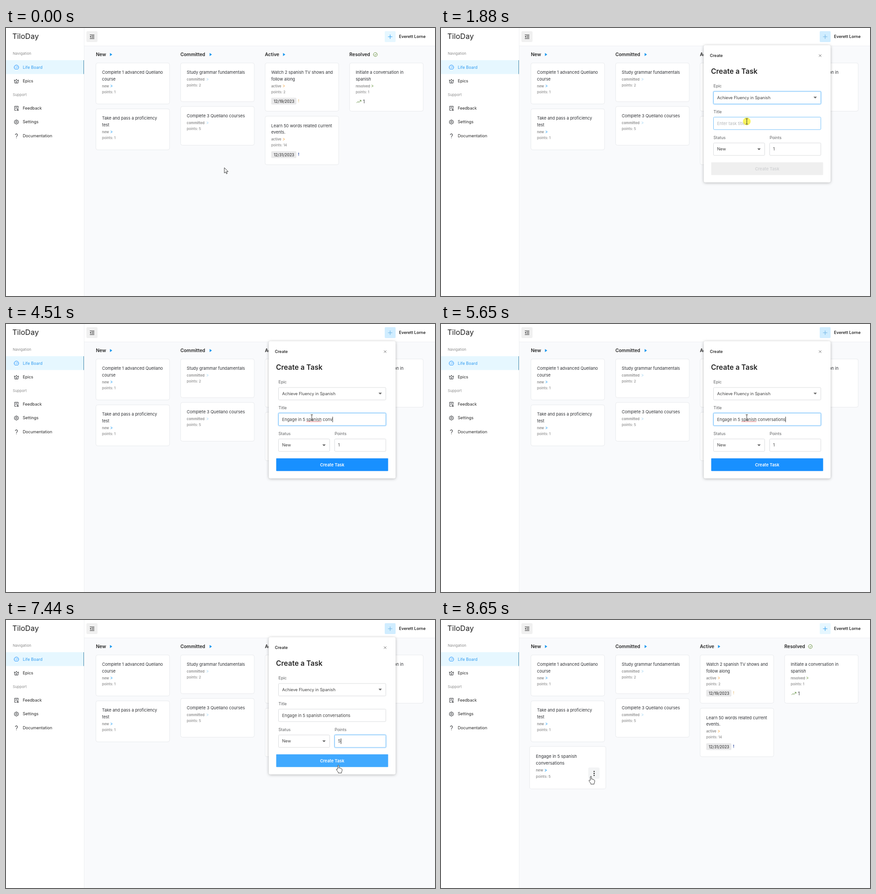
These frames come from a looping animation (947 px wide and 591 px high, 9.05 s). An HTML page:

```html
<!DOCTYPE html>
<html lang="en">
<head>
<meta charset="utf-8">
<title>Task board</title>
<style>
  html, body { margin: 0; width: 100%; height: 100%; overflow: hidden; background: #f9fafc; }
  svg { display: block; width: 947px; height: 591px; font-family: Inter, "Open Sans", sans-serif; }
  .panel { filter: drop-shadow(0 1px 3px rgba(0, 0, 0, .28)); }
</style>
</head>
<body>
<svg viewBox="0 0 947 591"><g id="board"></g><g id="live"></g></svg>
<script>
const LOOP = 9050;
const BLUE = '#1890ff', INK = '#303236', GRAY = '#8c8c8c';
const TASK = 'Engage in 5 spanish conversations';
const INPUT_SIZE = 9.2;

// ---------- drawing helpers ----------
const text = (x, y, str, size = 9.2, color = INK, weight = 430, extra = '') =>
  `<text x="${x}" y="${y}" font-size="${size}" fill="${color}" font-weight="${weight}" ${extra}>${str}</text>`;
const rect = (x, y, w, h, fill, r = 0, extra = '') =>
  `<rect x="${x}" y="${y}" width="${w}" height="${h}" rx="${r}" fill="${fill}" ${extra}/>`;
const line = (d, color, width = 1, extra = '') =>
  `<path d="${d}" fill="none" stroke="${color}" stroke-width="${width}" ${extra}/>`;
const shape = (d, fill, extra = '') => `<path d="${d}" fill="${fill}" ${extra}/>`;
const group = (content, attrs) => `<g ${attrs}>${content}</g>`;
const at = (x, y, content) => group(content, `transform="translate(${x} ${y})"`);

const pen = document.createElement('canvas').getContext('2d');
const inputWidth = str => {
  pen.font = `430 ${INPUT_SIZE}px Inter, "Open Sans", sans-serif`;
  return pen.measureText(str).width;
};

// ---------- timing helpers ----------
const progress = (t, from, to) => Math.min(1, Math.max(0, (t - from) / (to - from)));
const within = (t, from, to) => t >= from && t < to;
const smooth = p => p * p * (3 - 2 * p);
const latest = (steps, t) => steps.filter(s => s[0] <= t).pop()[1];

// ---------- board ----------
const STATUS = {
  new: { chevron: '#29a3f5', offset: 19 },
  committed: { chevron: '#a9d8f5', offset: 44 },
  active: { chevron: '#f5a742', offset: 26 },
  resolved: { chevron: '#6f9a45', offset: 35 }
};

function card(x, y, h, lines, status, points, extra = '') {
  const base = y + 24 + (lines.length - 1) * 14.7;
  const { chevron, offset } = STATUS[status];
  return rect(x, y, 162.5, h, '#fff', 4, 'stroke="#e8eaed"') +
    lines.map((s, i) => text(x + 13.5, y + 24 + i * 14.7, s)).join('') +
    text(x + 13.5, base + 15, status, 7.6, GRAY, 600) +
    line(`M${x + 13.5 + offset} ${base + 9.7}l3.6 2.4-3.6 2.4`, chevron) +
    text(x + 13.5, base + 28.2, 'points: ' + points, 7.6, GRAY, 540) + extra;
}

const dateChip = (y, date, mark) =>
  rect(585.5, y, 55.5, 15, '#e9e9ea', 2) + text(591, y + 10.7, date, 8.5, '#3a3a3a', 480) +
  text(644.5, y + 10.5, '!', 9.5, mark, 600);

const heading = (x, name, arrowX) => text(x, 61.7, name, 10.3, '#262626', 600) +
  (arrowX ? shape(`M${arrowX} 55l5 3.5-5 3.5z`, '#1c98ee') : '');

function navIcons() {
  const teeth = Array.from({ length: 8 }, (_, i) =>
    `<path d="M0-5.4V-4" transform="rotate(${i * 45})"/>`).join('');
  const outline = 'fill="none" stroke-width="1"';
  return at(23, 86.5, group('<path d="M-3.3 4A5 5 0 1 1 3.3 4zM0 1L2-2M-3 0h1M2.5 0h.8M-1.5-2.7l.4.6"/>',
      `${outline} stroke="${BLUE}"`)) +
    at(23, 117, group('<path d="M-4.7-2.5L-3.5 4.5h7L4.7-2.5 2-.6 0-4.2-2-.6z"/><circle cy="1.8" r="1.1"/>',
      `${outline} stroke="${INK}"`)) +
    at(23, 177, group('<path d="M4-.5V-4.5h-8V4.5H-.5M-2.2-2h4.5M-2.2.4h2.5M1 4.8q0-2 1.8-2t1.8 2z"/><circle cx="2.8" cy="1.5" r="1.1"/>',
      `${outline} stroke="${INK}"`)) +
    at(23, 207.3, group(`<circle r="4.1"/><circle r="1.6"/>${teeth}`, `${outline} stroke="${INK}"`)) +
    at(23, 238, line('M-2.4-2.2a2.4 2.4 0 1 1 3.6 2.1Q0 .6 0 2.2M0 3.8v1.2', INK, 1.1));
}

function board() {
  const nav = [['Life Board', 89.5], ['Epics', 120], ['Feedback', 180], ['Settings', 210.3], ['Documentation', 241.2]];
  return rect(0, 0, 947, 591, '#f9fafc') + rect(0, 0, 172, 591, '#fff') + rect(172, 0, 775, 39, '#fff') +
    line('M172.5 0V591M172 39.5H947', '#eef0f2') +
    text(14, 24, 'TiloDay', 16.4, '#1f1f1f', 400) +
    text(15, 59, 'Navigation', 8.1, GRAY) + text(15, 149.7, 'Support', 8.1, GRAY) +
    rect(0, 71, 171, 30.5, '#e6f7ff') + rect(171, 71, 1, 30.5, '#4289b0') +
    nav.map(([s, y], i) => text(37, y, s, 9.05, i ? '#262626' : '#329cf0')).join('') + navIcons() +
    rect(177.5, 7, 24.5, 24, '#f0f0f0', 3) +
    line('M185 15.2h10M189 17.9h6M189 20.6h6M185 23.4h10', '#262626') + shape('M187.6 17.2v4.2L185 19.3z', '#262626') +
    text(867.5, 22.3, 'Everett Lorne', 9.1, '#262626', 600) +
    heading(198.5, 'New', 229.5) + heading(385, 'Committed', 449.5) +
    heading(571.5, 'Active', 611.5) + heading(758, 'Resolved') +
    `<circle cx="815.3" cy="58.5" r="4.3" fill="none" stroke="#6a9240"/>` + line('M813 58.5l1.8 1.8 3-3.6', '#6a9240') +
    card(198.5, 77, 90.5, ['Complete 1 advanced Quellano', 'course'], 'new', 1) +
    card(198.5, 178.3, 90.5, ['Take and pass a proficiency', 'test'], 'new', 1) +
    card(385.5, 77, 85.5, ['Study grammar fundamentals'], 'committed', 2) +
    card(385.5, 173, 85.5, ['Complete 3 Quellano courses'], 'committed', 5) +
    card(572, 77, 106.5, ['Watch 2 spanish TV shows and', 'follow along'], 'active', 2, dateChip(153.8, '12/19/2023', '#ecc98a')) +
    card(572, 194.5, 107, ['Learn 50 words related current', 'events.'], 'active', 14, dateChip(271.8, '12/31/2023', '#27439b')) +
    card(758.5, 77, 106.5, ['Initiate a conversation in', 'spanish'], 'resolved', 1,
      line('M774 165.2l3-3 2 1.8 4.6-4.4M780.8 159.3h3v3', '#5c8a3a') + text(788, 165.5, '1', 10, INK));
}

function newCard(t) {
  if (t < 7840) return '';
  const hover = smooth(progress(t, 8480, 8640));
  const more = rect(325, 325.3, 25, 25, '#f3f4f5', 3) +
    [334, 338.4, 342.8].map(y => `<circle cx="338" cy="${y}" r="1.3" fill="#262626"/>`).join('');
  return group(card(198.5, 280.3, 90.5, ['Engage in 5 spanish', 'conversations'], 'new', 5),
    `transform="translate(279.75 325.5) scale(${1 + .036 * hover}) translate(-279.75 -325.5)"`) +
    group(more, `opacity="${hover}"`);
}

function plusButton(t) {
  const pressed = within(t, 420, 7820);
  return rect(836, 7, 24, 24, pressed ? '#d0edff' : '#e6f7ff', 2) +
    line('M843.2 19.3h9.6M848 14.5v9.6', pressed ? '#6fb4e4' : '#2d9ff2', 1.1);
}

// ---------- dialog ----------
const TYPING = [[0, 0], [2230, 1], [2300, 2], [2360, 3], [2430, 4], [2570, 5], [2630, 6],
  [2850, 7], [2910, 8], [2980, 9], [3040, 10], [3380, 11], [3500, 12], [3700, 15],
  [3840, 16], [3940, 17], [4040, 18], [4180, 19], [4240, 20], [4380, 22], [4510, 24],
  [4710, 25], [4840, 26], [4970, 27], [5170, 28], [5250, 29], [5340, 30], [5420, 31], [5510, 32], [5650, 33]];

function field(x, y, w, focused, hovered) {
  const glow = focused ? rect(x - 1, y - 1, w + 2, 29.5, 'none', 3, 'stroke="#1890ff" stroke-opacity=".2" stroke-width="1.6"') : '';
  return glow + rect(x, y, w, 27.5, '#fff', 2, `stroke="${focused || hovered ? '#74c0fa' : '#dadcde'}"`);
}
const triangle = (x, y, up) => shape(up ? `M${x - 3.7} ${y + 2}h7.4l-3.7-4z` : `M${x - 3.7} ${y - 2}h7.4l-3.7 4z`, '#666');
const caret = (x, y) => line(`M${x} ${y - 6}v12`, '#222');

function titleContent(t) {
  const typed = TASK.slice(0, latest(TYPING, t));
  const focused = within(t, 1940, 6380);
  let out = typed ? text(609.5, 213.8, typed, INPUT_SIZE, '#404040') : text(609.5, 213.8, 'Enter task title', 9.2, '#b4b6b8');
  if (focused) out += caret(610 + inputWidth(typed), 210.5);
  if (focused && t >= 4240) {
    const from = 609.5 + inputWidth('Engage in 5 ');
    const waves = Math.round(inputWidth('spanish') / 3);
    out += line(`M${from} 216` + 'l1.5-1.4l1.5 1.4'.repeat(waves), '#e0444c', .8);
  }
  return out;
}

function pointsContent(t) {
  const selected = within(t, 6510, 7440);
  return (selected ? rect(732.3, 261, 5.6, 12.3, '#3c5a9c') : '') +
    text(733, 270.4, t < 7440 ? '1' : '5', 9.1, selected ? '#fff' : '#404040') +
    (within(t, 7440, 7770) ? caret(739.5, 267.3) : '');
}

function submitButton(t) {
  const enabled = smooth(progress(t, 2200, 2430));
  const label = color => text(720, 314.2, 'Create Task', 9.3, color, 600, 'text-anchor="middle"');
  const hover = within(t, 6900, 7770);
  return rect(596.5, 296.3, 247, 28, '#efefef', 1) + label('#d2d3d5') +
    group(rect(596.5, 296.3, 247, 28, hover ? '#40a9ff' : BLUE, 1) + label('#fff'), `opacity="${enabled}"`);
}

function options(t) {
  const opacity = progress(t, 1000, 1130) * (1 - progress(t, 1530, 1700));
  if (!opacity) return '';
  return group(rect(601.5, 170, 237, 34, '#fff', 2, 'class="panel"') +
    rect(601.5, 174.5, 237, 25, t > 1150 ? '#eef3f7' : '#fff') +
    text(609.5, 190.5, 'Achieve Fluency in Spanish', 9.1, '#404040'), `opacity="${opacity}"`);
}

function dialog(t) {
  const opacity = smooth(progress(t, 500, 680)) * (1 - progress(t, 7770, 7970)) ** 2;
  if (!opacity) return '';
  const label = (x, y, s) => text(x, y, s, 9, '#606264');
  return group(
    rect(580, 38, 280, 302.5, '#fff', 4, 'class="panel"') +
    text(593.5, 64.3, 'Create', 8.9, '#303030', 600) + line('M834.2 58.2l5.4 5.4m0-5.4l-5.4 5.4', '#777') +
    text(596, 100.7, 'Create a Task', 15.6, '#262626', 600) +
    label(601.5, 131, 'Epic') + label(601.5, 188, 'Title') + label(601.5, 245, 'Status') + label(725.5, 245, 'Points') +
    field(601.5, 140, 237, within(t, 930, 1940), within(t, 850, 930)) + triangle(826, 153.5, within(t, 930, 1530)) +
    (t >= 1530 ? text(609.5, 157, 'Achieve Fluency in Spanish', 9.1, '#404040') : '') +
    field(601.5, 196.5, 237, within(t, 1940, 6380), within(t, 1780, 1940)) + titleContent(t) +
    field(601.5, 253.5, 113, false, within(t, 6600, 6840)) + text(609.5, 270.4, 'New', 9.1, '#404040') + triangle(702, 267.5) +
    field(725.5, 253.5, 113, within(t, 6380, 7770), within(t, 6330, 6380)) + pointsContent(t) +
    submitButton(t) + options(t), `opacity="${opacity}"`);
}

// ---------- pointer ----------
const PATH = [[0, 482, 308], [70, 482, 308], [410, 848, 21], [590, 848, 21], [880, 755, 147], [1000, 755, 147],
  [1260, 712, 186], [1590, 712, 186], [1810, 675, 206], [6060, 675, 206], [6370, 741, 267], [6510, 724, 268],
  [6640, 724, 268], [6710, 694, 281], [6780, 694, 283], [7300, 734, 322], [7400, 734, 322], [7570, 732, 311],
  [8120, 732, 311], [8430, 420, 386], [8650, 331, 345], [LOOP, 331, 345]];
const POINTERS = [[0, 'arrow'], [390, 'hand'], [620, 'arrow'], [1780, 'beam'], [6130, 'arrow'], [6300, 'beam'],
  [6660, 'arrow'], [6900, 'hand'], [8160, 'arrow'], [8500, 'hand']];
const CLICKS = [[430, 560], [890, 1040], [1460, 1590], [1860, 2010], [6380, 6510], [7770, 7860]];

const EDGE = 'stroke="#222" stroke-width=".9" stroke-linejoin="round"';
const GLYPHS = {
  arrow: shape('M0 0V12L2.8 9.4 4.6 13.6 6.4 12.8 4.6 8.7H8.4Z', '#fff', EDGE),
  hand: shape('M-1.4 8.5V1a1.3 1.3 0 0 1 2.6 0V6l1-.4 1.3.2.4.8 1.2-.1.9.5.4.7 1 .1.8.8v3.4L7 15v2H-.3v-1.6L-4.4 9.6l.3-1.2 1.3-.1z', '#fff', EDGE),
  beam: line('M-2.5-6h5M0-6V6M-2.5 6h5', '#333')
};

function pointer(t) {
  const next = PATH.findIndex(p => p[0] > t);
  const [t0, x0, y0] = PATH[next - 1], [t1, x1, y1] = PATH[next];
  const p = smooth(progress(t, t0, t1));
  const halo = CLICKS.some(([a, b]) => within(t, a, b))
    ? '<circle r="8.5" fill="#f5ee20" fill-opacity=".72"/>' : '';
  return at(x0 + (x1 - x0) * p, y0 + (y1 - y0) * p, halo + GLYPHS[latest(POINTERS, t)]);
}

// ---------- run ----------
const live = document.getElementById('live');
document.getElementById('board').innerHTML = board();

function render() {
  const t = performance.now() % LOOP;
  live.innerHTML = plusButton(t) + newCard(t) + dialog(t) + pointer(t);
  requestAnimationFrame(render);
}
render();
</script>
</body>
</html>
```
